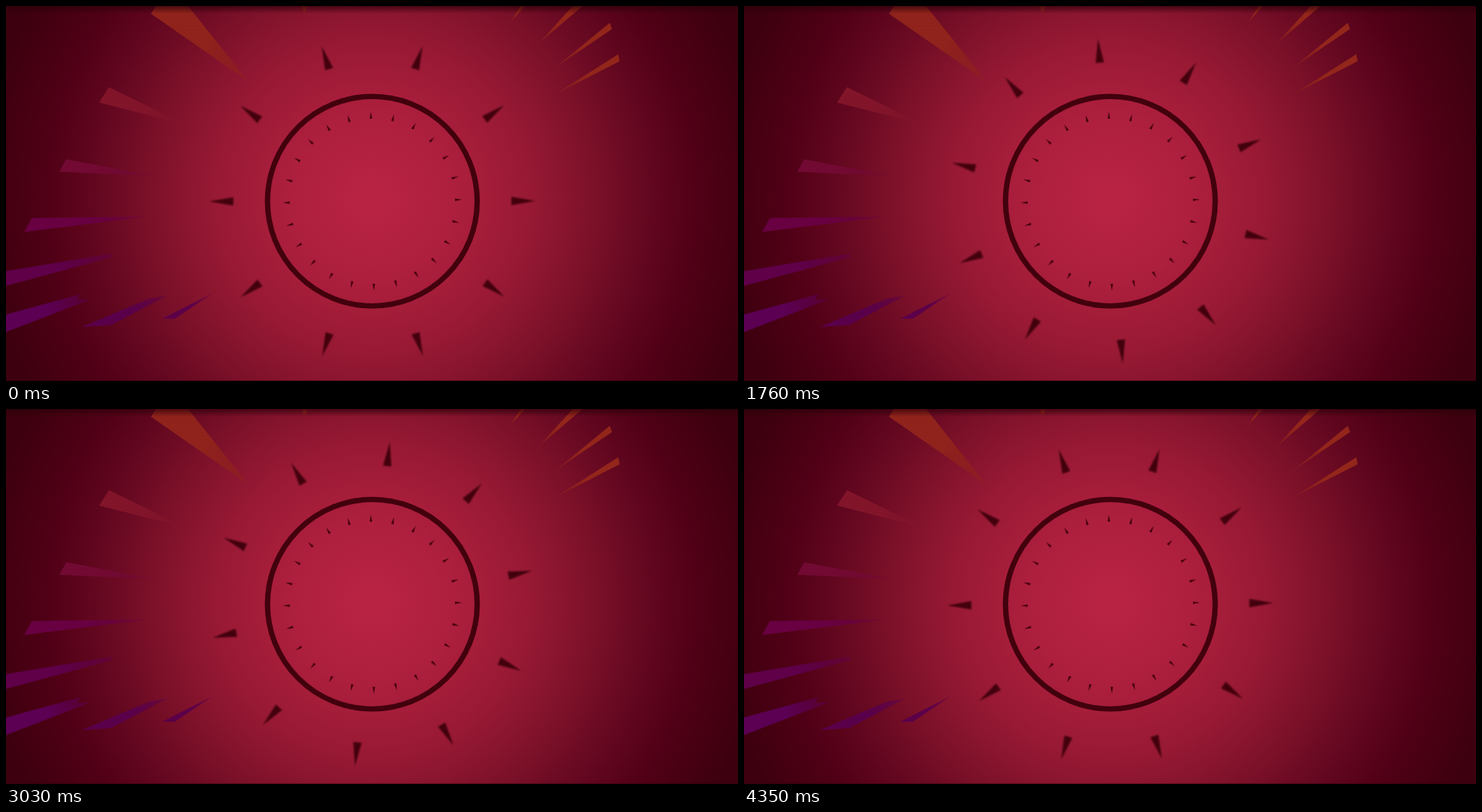
An HTML page that plays this animation: 1045 px wide and 536 px high, repeating every 4390 ms.

```html
<!DOCTYPE html>
<html>
<head>
<meta charset="utf-8">
<style>
  html, body { margin: 0; width: 100%; height: 100%; overflow: hidden; background: #3c000f; }
  svg { display: block; }
  #spikes { filter: blur(.8px); }
  #ticks { filter: blur(.4px); }
</style>
</head>
<body>
<svg width="1045" height="536" viewBox="0 0 1045 536">
  <defs>
    <radialGradient id="glow" gradientUnits="userSpaceOnUse" cx="523" cy="274" r="560">
      <stop offset="0" stop-color="#c62648"/>
      <stop offset=".2" stop-color="#b92242"/>
      <stop offset=".4" stop-color="#a11b37"/>
      <stop offset=".55" stop-color="#86132d"/>
      <stop offset=".7" stop-color="#690822"/>
      <stop offset=".83" stop-color="#540017"/>
      <stop offset="1" stop-color="#3f000f"/>
    </radialGradient>
    <linearGradient id="shade" x2="0" y2="1">
      <stop offset="0" stop-color="#2a0008" stop-opacity=".7"/>
      <stop offset="1" stop-color="#2a0008" stop-opacity="0"/>
    </linearGradient>
    <pattern id="lines" width="2" height="2" patternUnits="userSpaceOnUse">
      <rect y="1" width="2" height="1" fill="#20000a" fill-opacity=".14"/>
    </pattern>
  </defs>
  <rect width="1045" height="536" fill="url(#glow)"/>
  <g id="rays"></g>
  <rect width="1045" height="536" fill="url(#lines)"/>
  <rect width="1045" height="11" fill="url(#shade)"/>
  <rect y="535" width="1045" height="1" fill="#2a0008" fill-opacity=".5"/>
  <g transform="translate(523 279)" fill="#42000d">
    <circle r="149.7" fill="none" stroke="#42000d" stroke-width="7.6"/>
    <g id="ticks" transform="rotate(-1)"></g>
    <g id="spikes"></g>
  </g>
</svg>
<script>
const LOOP = 4390;
const $ = id => document.getElementById(id);

// Each ray: colour, base point, tip point, outline.
const rays = [
  ['#98251d', 225, 0, 346, 108, '207,11 214,0 260,0 346,108'],
  ['#8a162c', 140, 127, 255, 169, '147,116 133,138 255,169'],
  ['#780a36', 81, 228, 212, 243, '86,219 76,237 212,243'],
  ['#6e0046', 31, 313, 202, 301, '37,303 26,323 202,301'],
  ['#64004e', 0, 389, 154, 355, '0,379 150,354 152,359 0,400'],
  ['#600058', 0, 453, 122, 418, '0,441 106,412 102,420 122,419 0,466'],
  ['#5e0050', 125, 458, 232, 413, '108,459 205,418 230,414 150,456'],
  ['#60004e', 230, 447, 296, 410, '223,447 296,410 241,447'],
  ['#9c291c', 738, 0, 719, 24, '719,24 735,0 741,0'],
  ['#9c291c', 818, 0, 760, 54, '760,54 809,0 823,0'],
  ['#9c291c', 864, 28, 784, 88, '784,88 862,24 865,33'],
  ['#9c291c', 875, 74, 786, 125, '786,125 874,69 876,79'],
  ['#a82a22', 426, 0, 426, 10, '422,0 431,0 426,10']
];
$('rays').innerHTML = rays.map(([color, x1, y1, x2, y2, points], i) => `
  <linearGradient id="ray${i}" gradientUnits="userSpaceOnUse" x1="${x1}" y1="${y1}" x2="${x2}" y2="${y2}">
    <stop offset=".5" stop-color="${color}"/>
    <stop offset="1" stop-color="${color}" stop-opacity=".4"/>
  </linearGradient>
  <polygon points="${points}" fill="url(#ray${i})"/>`).join('');

// A ring of triangles pointing outwards.
function addRing(id, count, base, tip, half) {
  $(id).innerHTML = Array.from({ length: count }, (_, i) =>
    `<path d="M${base} ${-half}L${tip} 0L${base} ${half}Z" transform="rotate(${i * 360 / count})"/>`
  ).join('');
}
addRing('ticks', 24, 118, 128, 1.8);
addRing('spikes', 10, 198.5, 233, 6);

function frame(now) {
  const u = now % LOOP / LOOP;
  const turn = u + .08 * (u * u - u); // speeds up slightly
  $('spikes').setAttribute('transform', `rotate(${36 * turn - .1})`);
  requestAnimationFrame(frame);
}
frame(0);
</script>
</body>
</html>
```
